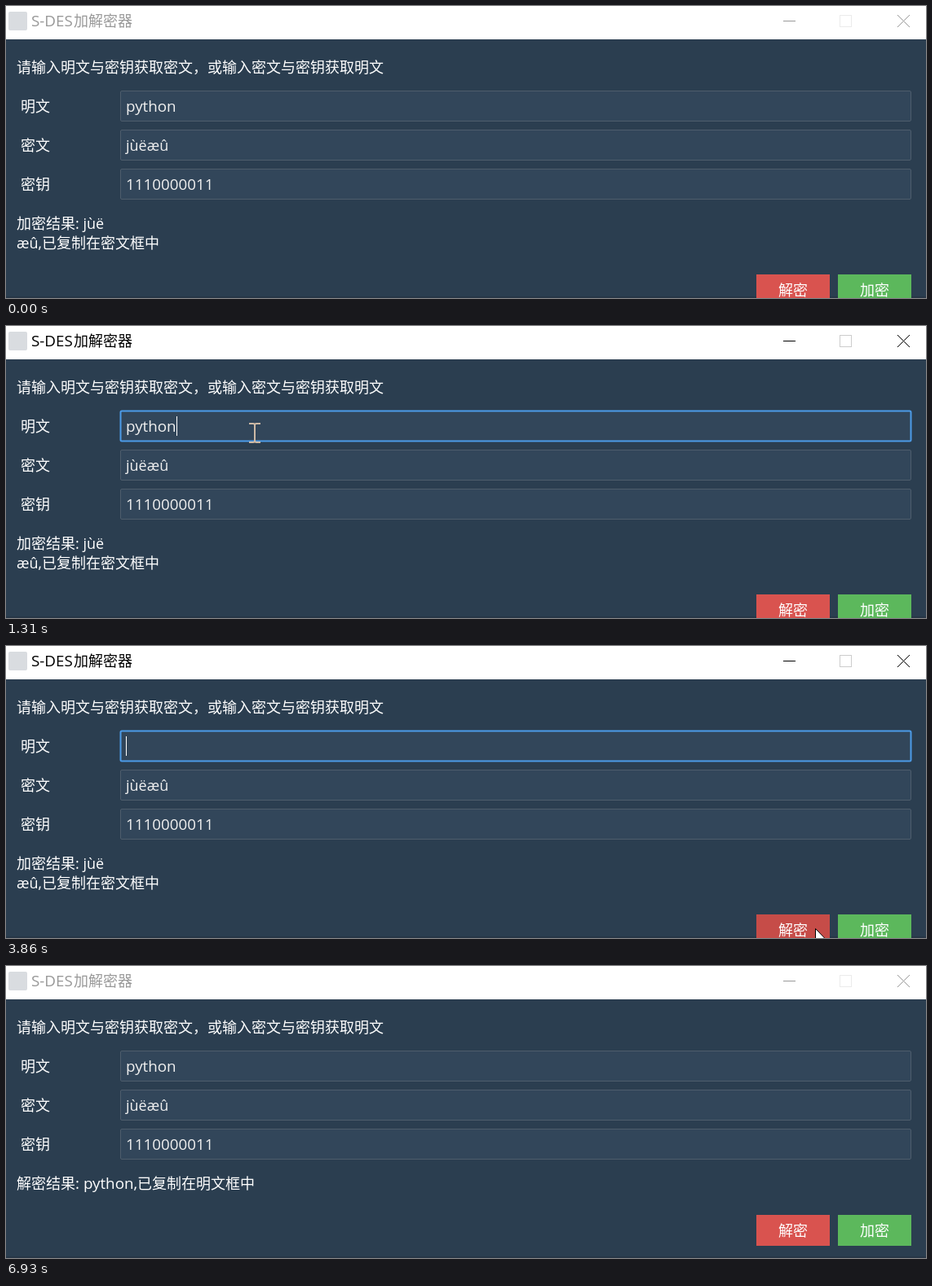
An HTML page for the animation above (7000 ms loop, 1128x359 px).

```html
<!DOCTYPE html>
<html lang="zh">
<head>
<meta charset="utf-8">
<title>S-DES加解密器</title>
<style>
html, body { margin: 0; width: 100%; height: 100%; overflow: hidden; background: #2b3e50; }
svg { display: block; width: 1128px; height: 359px; }
text { font: 18px "Open Sans", "Noto Sans", "Noto Sans CJK SC", "Noto Sans CJK", sans-serif; fill: #fff; white-space: pre; }
.latin { font-size: 18.8px; }
.entry { fill: #32465a; }
.value { fill: #f0f0f0; }
</style>
</head>
<body>
<svg viewBox="0 0 1128 359">
  <rect width="1128" height="359" fill="#2b3e50"/>
  <rect width="1128" height="41" fill="#fff"/>
  <rect y="357" width="1128" height="2" fill="#273747"/>
  <rect x="3" y="7" width="23" height="23" rx="2" fill="#d9dce0"/>
  <text id="title" x="31" y="25"><tspan class="latin">S-DES</tspan><tspan x="83">加解密器</tspan></text>
  <path id="controls" d="M953 18.5H968M1093 11L1108 26M1108 11L1093 26" fill="none"/>
  <rect id="maximize" x="1022.5" y="11.5" width="14" height="14" fill="none"/>

  <text x="13" y="82">请输入明文与密钥获取密文，或输入密文与密钥获取明文</text>
  <g id="rows"></g>
  <rect id="selection" y="111" height="24" fill="#526170"/>
  <text id="plain" class="value latin" x="147" y="130">python</text>
  <text class="value" x="147" y="178">jùëæû</text>
  <text class="value latin" x="147" y="226">1110000011</text>
  <rect id="caret" y="111" width="1" height="24" fill="#fff"/>

  <g id="encrypted">
    <text x="13" y="274">加密结果: jùë</text>
    <text x="13" y="298">æû,已复制在密文框中</text>
  </g>
  <text id="decrypted" x="13" y="274">解密结果<tspan class="latin">: python,</tspan>已复制在明文框中</text>

  <g id="buttons">
    <rect id="decrypt" x="920" width="90" height="38"/>
    <rect id="focus" x="922.5" y="2.5" width="85" height="33" fill="none" stroke="#fff" stroke-dasharray="3 2"/>
    <text x="947" y="26">解密</text>
    <rect x="1020" width="90" height="38" fill="#5cb85c"/>
    <text x="1047" y="26">加密</text>
  </g>

  <path id="arrow" d="M-.5 .5V23.6L4.8 18.6L8.5 26.6L12 25L8.2 17.2H15.6Z" fill="#fff" stroke="#000"/>
  <path id="beam" d="M-7 -11H-2Q0 -11 0 -9Q0 -11 2 -11H7M0 -9V10M-7 12H-2Q0 12 0 10Q0 12 2 12H7" fill="none" stroke="#cdb9a5" stroke-width="2"/>
</svg>
<script>
const LOOP = 7000;
const [FOCUS, DELETE, PRESS, RESULT, BLUR] = [1100, 2180, 4120, 4250, 6930];
const [TEXT_LEFT, TEXT_RIGHT] = [147, 209];
const $ = id => document.getElementById(id);

const moves = [
  { from: 70, to: 830, steps: 11, curve: [[640, 326], [380, 100], [523, 128]] },
  { from: 1100, to: 1720, steps: 9, curve: [[523, 128], [20, 136], [45, 122]] },
  { from: 2640, to: 2910, steps: 4, curve: [[70, 140], [400, 226], [793, 285]] },
  { from: 3120, to: 3380, steps: 5, curve: [[800, 263], [880, 270], [970, 345]] },
  { from: 3520, to: 3860, steps: 5, curve: [[972, 345], [985, 346], [993, 347]] },
  { from: 4450, to: 4660, steps: 4, curve: [[960, 320], [760, 270], [582, 238]] },
  { from: 4790, to: 5140, steps: 6, curve: [[590, 225], [700, 200], [927, 318]] }
];

const within = (v, low, high) => v >= low && v < high;
const set = (id, attrs) => {
  for (const name in attrs) $(id).setAttribute(name, attrs[name]);
};
const show = (id, on) => set(id, { visibility: on ? 'visible' : 'hidden' });

const rowTop = i => 104 + 48 * i;
$('rows').innerHTML = ['明文', '密文', '密钥'].map((label, i) => `
  <text x="18" y="${rowTop(i) + 26}">${label}</text>
  <rect class="entry" x="140.5" y="${rowTop(i) + .5}" width="969" height="37" rx="1.5"/>`).join('');
const entries = [...document.querySelectorAll('.entry')];

function pointer(t) {
  if (!within(t, 70, 5210)) return null;
  const { from, to, steps, curve: [a, b, c] } = moves.filter(m => m.from <= t).pop();
  const gaps = steps - 1;
  const u = Math.min(1, Math.floor((t - from) / (to - from) * gaps) / gaps);
  return a.map((v, k) => Math.round(v * (1 - u) ** 2 + 2 * b[k] * u * (1 - u) + c[k] * u * u));
}

function drawEntries(t, x, y) {
  const editing = within(t, FOCUS, PRESS);
  let over = false;
  entries.forEach((entry, i) => {
    const hover = within(x, 140, 1110) && within(y, rowTop(i), rowTop(i) + 38);
    const focused = i === 0 && editing;
    over = over || hover;
    entry.style.stroke = hover || focused ? '#4c9be8' : '#4e5d6c';
    entry.style.strokeWidth = focused ? 2 : 1;
  });

  // Dragging left selects whole letters from the end
  const hasText = !within(t, DELETE, RESULT);
  const letter = (TEXT_RIGHT - TEXT_LEFT) / 6;
  const kept = Math.max(0, Math.min(6, Math.round((x - TEXT_LEFT) / letter)));
  const left = t < DELETE ? TEXT_LEFT + kept * letter : TEXT_LEFT;
  set('selection', { x: left, width: editing && hasText ? TEXT_RIGHT - left : 0 });
  show('plain', hasText);
  set('caret', { x: left });
  show('caret', editing && (t + 590) % 880 < 590);
  return over;
}

function draw(t) {
  const active = within(t, FOCUS, BLUR);
  const done = t >= RESULT;
  const at = pointer(t);
  const [x, y] = at || [-99, -99];

  $('title').style.fill = active ? '#000' : '#999';
  set('controls', { stroke: active ? '#000' : '#999' });
  set('maximize', { stroke: active ? '#ccc' : '#ebebeb' });

  const overEntry = drawEntries(t, x, y);
  show('encrypted', !done);
  show('decrypted', done);

  const overButton = !done && within(x, 920, 1010) && y >= 330;
  const pressed = within(t, PRESS, RESULT);
  set('buttons', { transform: `translate(0 ${done ? 306 : 330})` });
  set('decrypt', { fill: pressed ? '#b94743' : overButton ? '#c64c48' : '#d9534f' });
  show('focus', within(t, PRESS, BLUR));

  for (const id of ['arrow', 'beam']) {
    set(id, { transform: `translate(${x} ${y})` });
    show(id, at && overEntry === (id === 'beam'));
  }
}

function tick() {
  draw(performance.now() % LOOP);
  requestAnimationFrame(tick);
}
tick();
</script>
</body>
</html>
```
